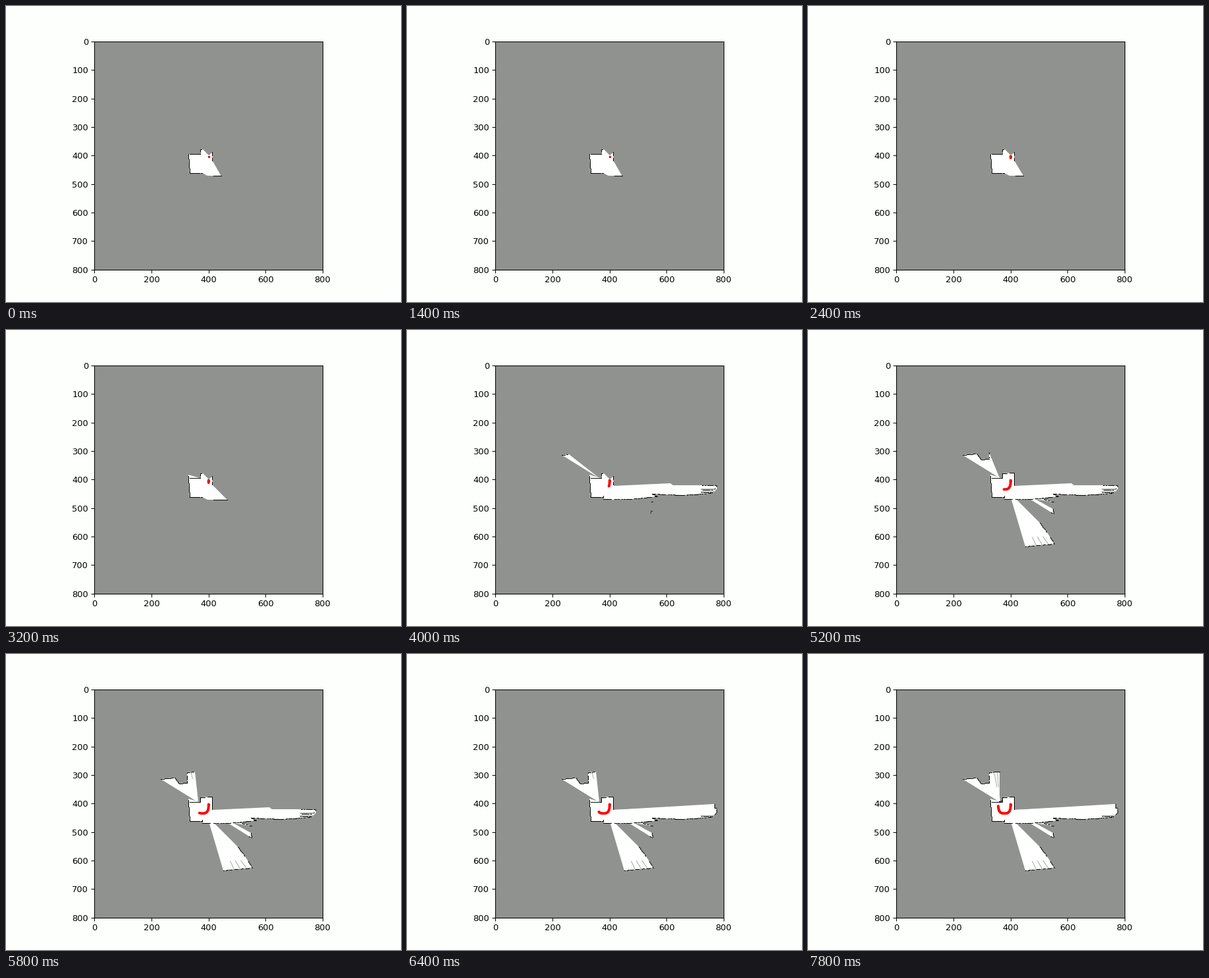
A matplotlib script for the animation above (8000 ms loop, 600 px wide and 450 px high).

```python
import numpy as np
import matplotlib.pyplot as plt
from matplotlib.animation import FuncAnimation
from matplotlib.patches import Polygon

STEP, FRAMES, END = 200, 40, 8000
WIDTH, HEIGHT, DPI = 600, 450, 93.75
PX = 72 / DPI  # one pixel in points
PAPER, GRAY = "#fdfffc", "#90928f"

rng = np.random.default_rng(4)
plt.rcParams["font.family"] = "DejaVu Sans"
fig = plt.figure(figsize=(WIDTH / DPI, HEIGHT / DPI), dpi=DPI, facecolor=PAPER)
ax = fig.add_subplot()
ax.set_facecolor(GRAY)
ax.set(xlim=(0, 800), ylim=(800, 0), aspect="equal",
       xticks=range(0, 801, 200), yticks=range(0, 801, 100))

# The map is drawn in stage pixels on a transparent layer.
stage = fig.add_axes([0, 0, 1, 1])
stage.set(xlim=(0, WIDTH), ylim=(HEIGHT, 0))
stage.axis("off")

timed = []


def show(artist, start, end):
    timed.append((start, end, artist))
    return artist


def wall(*corners, start=0, end=END, gaps=0.1):
    """Stepped black line along the corners with random cells missing."""
    cells = []
    for a, b in zip(corners[:-1], corners[1:]):
        count = int(max(abs(b[0] - a[0]), abs(b[1] - a[1]))) + 1
        cells.append(np.linspace(a, b, count))
    cells = np.round(np.concatenate(cells)) + 0.5
    hidden = rng.random(len(cells)) < gaps
    hidden[[0, -1]] = False
    cells[hidden] = np.nan
    line, = stage.plot(*cells.T, color="black", lw=0.95 * PX, zorder=3,
                       solid_capstyle="projecting", snap=False)
    return show(line, start, end)


def region(*corners, walled=0, start=0, end=END, gaps=0.1):
    """Free space; its first `walled` corners are joined by a wall."""
    patch = stage.add_patch(Polygon(corners, fc="white", ec="none", zorder=1))
    if walled:
        wall(*corners[:walled], start=start, end=end, gaps=gaps)
    return show(patch, start, end)


def shadow(a, b, width=0.8, start=0, end=END):
    line, = stage.plot([a[0], b[0]], [a[1], b[1]], color=GRAY, lw=width * PX, zorder=2)
    return show(line, start, end)


def shadow_fan(eye, left, right, shares, depth, **when):
    """Unseen streaks at the far end of the rays from eye to left..right."""
    eye, left, right = map(np.array, (eye, left, right))
    for share in shares:
        far = left + share * (right - left)
        shadow(far + depth * (eye - far), far, **when)


# Room
region((298, 254), (279, 254), (277, 225), (295, 225), (295, 218), (299, 218),
       (308, 227), (313, 223), (314, 236), (319, 258), (306, 258), walled=6)
wall((313, 222), (313, 235))
region((277, 225), (277, 220), (294, 225), walled=2, start=2600)
region((310, 257), (298, 257), (298, 252), (314, 240), walled=3, start=3800)
region((295, 224), (295, 218), (313, 217), (313, 236), (300, 240), walled=4, start=4600)
wall((290, 224), (295, 223), start=6800)

# View sweeping along the bottom wall
wedge = show(region((314, 236), (326, 258), (306, 258)), 0, 4000)
wedge_wall, = stage.plot([], [], color="black", lw=0.95 * PX, zorder=3)
show(wedge_wall, 0, 4000)

# Corridor to the right
region((465, 248), (418, 251), (372, 249), (380, 253), (340, 257), (300, 257),
       (314, 237), (400, 233), (404, 236), (471, 236), (471, 241),
       walled=6, start=4000, gaps=0.25)
wall((448, 236), (470, 236), (470, 240), (467, 241), start=4000, end=6200)
for y, end in ((242, 6200), (246, END)):
    shadow((447, y), (467, y), 1.5, 4000, end)
    wall((447, y + 1), (464, y + 1), start=4000, end=end)
region((467, 228), (467, 234), (470, 234), (470, 241), (467, 244), (314, 250),
       (314, 237), walled=5, start=6200)

# Beams to the upper left
region((235, 190), (246, 189), (292, 225), (277, 216), walled=2, start=3800)
region((235, 190), (256, 188), (263, 197), (275, 196), (275, 186), (291, 225),
       (277, 216), walled=5, start=4600)
region((275, 196), (275, 180), (287, 179), (292, 224), (280, 217), walled=3, start=5400)
region((285, 179), (291, 179), (291, 224), (287, 215), walled=2, start=6800)
shadow_fan((291, 223), (275, 181), (291, 181), [0.4], 0.2, start=5400, end=6800)
shadow_fan((291, 223), (275, 181), (291, 181), [0.5, 0.8], 0.5, start=6800)

# Beams to the lower right
region((352, 293), (364, 309), (374, 325), (330, 329), (309, 258), (317, 258),
       walled=4, start=4400, gaps=0.25)
shadow_fan((309, 248), (330, 328), (374, 325), [0.37, 0.58, 0.8], 0.15, start=4400)
region((369, 277), (373, 279), (372, 272), (345, 257), (337, 257), walled=3, start=4400)
region((371, 261), (358, 257), (345, 257), walled=2, start=4400, gaps=0.3)
wall((371, 261), (373, 261), start=4000)
wall((370, 278), (370, 275), (372, 275), start=4000, end=4400)

# Travelled path: a rounded U, followed by angle
CENTER, RADII, ROUNDNESS = (298.4, 228.5), (9.4, 13.8), 0.7
TURN_TIMES, TURNS = [1400, 3200, 4000, 5200, 7800], [0, 0.15, 0.57, 1.6, 3.05]
trail, = stage.plot([], [], color="red", lw=4 * PX, zorder=5,
                    solid_capstyle="round", solid_joinstyle="round")
stage.plot(CENTER[0] + RADII[0], CENTER[1], "o", color="red", ms=3.5 * PX, mew=0, zorder=5)


def path_to(turn):
    angle = np.linspace(0, turn, 60)
    x, y = np.cos(angle), np.sin(angle)
    return (CENTER[0] + RADII[0] * np.sign(x) * np.abs(x) ** ROUNDNESS,
            CENTER[1] + RADII[1] * np.abs(y) ** ROUNDNESS)


def update(i):
    now = i * STEP
    for start, end, artist in timed:
        artist.set_visible(start <= now < end)

    tip = 326.5 + 25.5 * (max(0, now - 1400) / 2200) ** 5
    wedge.set_xy([(314, 236), (tip, 258), (306, 258)])
    wedge_wall.set_data([315, tip], [257.5, 257.5])

    trail.set_data(*path_to(np.interp(now, TURN_TIMES, TURNS)))
    trail.set_visible(now > 1400)
    return []


anim = FuncAnimation(fig, update, frames=FRAMES, interval=STEP, repeat=True, repeat_delay=0)
plt.show()
```
